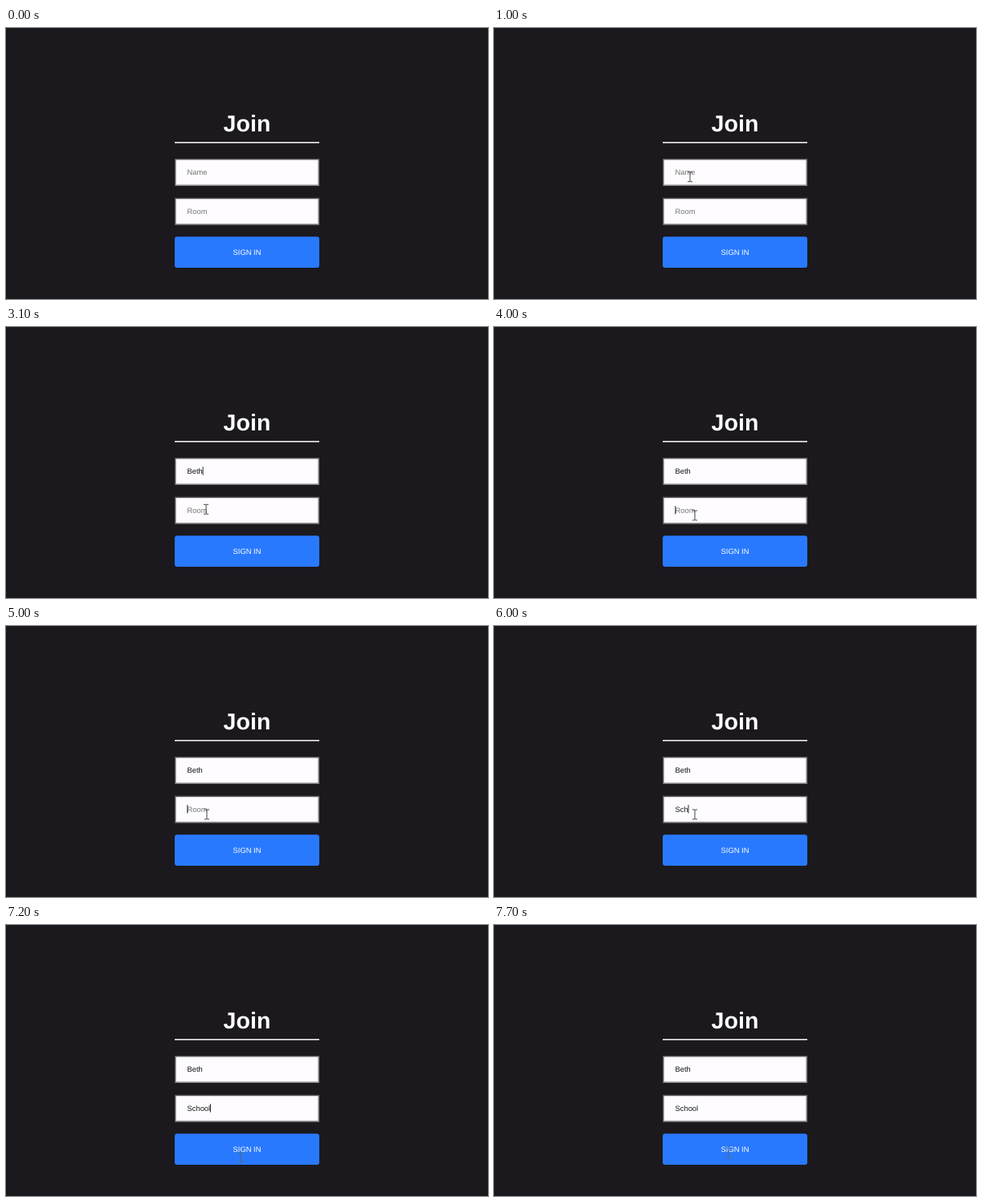
An HTML page for the animation above (8 s loop, 600 px wide and 338 px high).

```html
<!DOCTYPE html>
<html lang="en">
<head>
<meta charset="utf-8">
<title>Join</title>
<style>
  html, body { margin: 0; width: 100%; height: 100%; overflow: hidden; background: #1b191d; }
  svg { display: block; width: 600px; height: 338px; }
  text { font: 9.37px "Liberation Sans", Arial, sans-serif; text-rendering: geometricPrecision; }
  .title { font-size: 28.6px; font-weight: bold; }
  .mid { text-anchor: middle; fill: #fff; }
</style>
</head>
<body>
<svg viewBox="0 0 600 338">
  <defs>
    <g id="box">
      <path d="M0 0H180L178.6 1.4H1.4V32.6L0 34Z" fill="#58565a"/>
      <path d="M180 0V34H0L1.4 32.6H178.6V1.4Z" fill="#858387"/>
      <rect x="1.4" y="1.4" width="177.2" height="31.2" fill="#fefcff"/>
    </g>
  </defs>
  <rect width="600" height="338" fill="#1b191d"/>
  <text class="title mid" x="300" y="129">Join</text>
  <rect x="210" y="142.1" width="180" height="1.5" fill="#fff"/>
  <use href="#box" x="210" y="163"/>
  <use href="#box" x="210" y="211.8"/>
  <text id="name" x="225.5" y="183"></text>
  <text id="room" x="225.5" y="231.8"></text>
  <rect x="210" y="260.2" width="180" height="38.8" rx="3" fill="#2979ff"/>
  <text class="mid" x="300" y="282.7">SIGN IN</text>
  <rect id="caret" width="0.9" height="10.4" fill="#111"/>
  <path id="beam" d="M-3 -6H-1Q0 -6 0 -5Q0 -6 1 -6H3M0 -5V5M-3 6H-1Q0 6 0 5Q0 6 1 6H3" fill="none" stroke-width="1"/>
  <path id="arrow" d="M0 0V12.2L2.8 9.6L4.9 14.2L7 13.2L5 8.9H8.7Z" fill="#fff" stroke="#222" stroke-width="0.7"/>
</svg>
<script>
const LOOP = 8000, STEP = 100;
const $ = id => document.getElementById(id);

const fields = {
  name: { el: $("name"), hint: "Name", word: "Beth", keys: [1900, 2300, 2800, 3000], y: 174.3 },
  room: { el: $("room"), hint: "Room", word: "School", keys: [5500, 5800, 6000, 6400, 6500, 6800], y: 223.1 }
};

// Spans in which the caret is lit: [field, from, to]
const lit = [
  ["name", 1200, 1700], ["name", 1900, 3500],
  ["room", 3900, 4500], ["room", 5000, 7400]
];

// Pointer path: [time, x, y]
const path = [
  [400, 244, 185.7], [2800, 244, 185.7], [3200, 250, 235],
  [6700, 250, 235], [6900, 286.7, 268], [7200, 292, 289.5],
  [7400, 292, 289.5], [7700, 292, 284], [8000, 292, 284]
];

const ease = u => u * u * (3 - 2 * u);

function pointer(t) {
  const i = path.findIndex(p => p[0] > t);
  if (i < 1) return null;
  const [t0, x0, y0] = path[i - 1], [t1, x1, y1] = path[i];
  const u = ease((t - t0) / (t1 - t0));
  return [x0 + (x1 - x0) * u, y0 + (y1 - y0) * u];
}

const show = (el, on) => el.setAttribute("visibility", on ? "visible" : "hidden");

function drawField(f, t) {
  const typed = f.word.slice(0, f.keys.filter(k => k <= t).length);
  f.el.textContent = typed || f.hint;
  f.el.setAttribute("fill", typed ? "#161616" : "#757575");
  f.end = 225.5 + (typed ? f.el.getComputedTextLength() : 0);
}

function draw(t) {
  drawField(fields.name, t);
  drawField(fields.room, t);

  const span = lit.find(s => s[1] <= t && t < s[2]);
  show($("caret"), span);
  if (span) {
    const f = fields[span[0]];
    $("caret").setAttribute("x", f.end - 0.1);
    $("caret").setAttribute("y", f.y);
  }

  const p = pointer(t);
  const overText = p && (p[1] < 197 || (p[1] > 211 && p[1] < 246) || p[1] > 273);
  show($("beam"), p && overText);
  show($("arrow"), p && !overText);
  if (p) {
    const el = overText ? $("beam") : $("arrow");
    el.setAttribute("transform", `translate(${p[0]} ${p[1]})`);
    $("beam").setAttribute("stroke", p[1] > 260 ? "#56677f" : "#444");
  }
}

const start = performance.now();
function tick() {
  const t = (performance.now() - start) % LOOP;
  draw(Math.floor(t / STEP) * STEP);
  requestAnimationFrame(tick);
}
tick();
</script>
</body>
</html>
```
